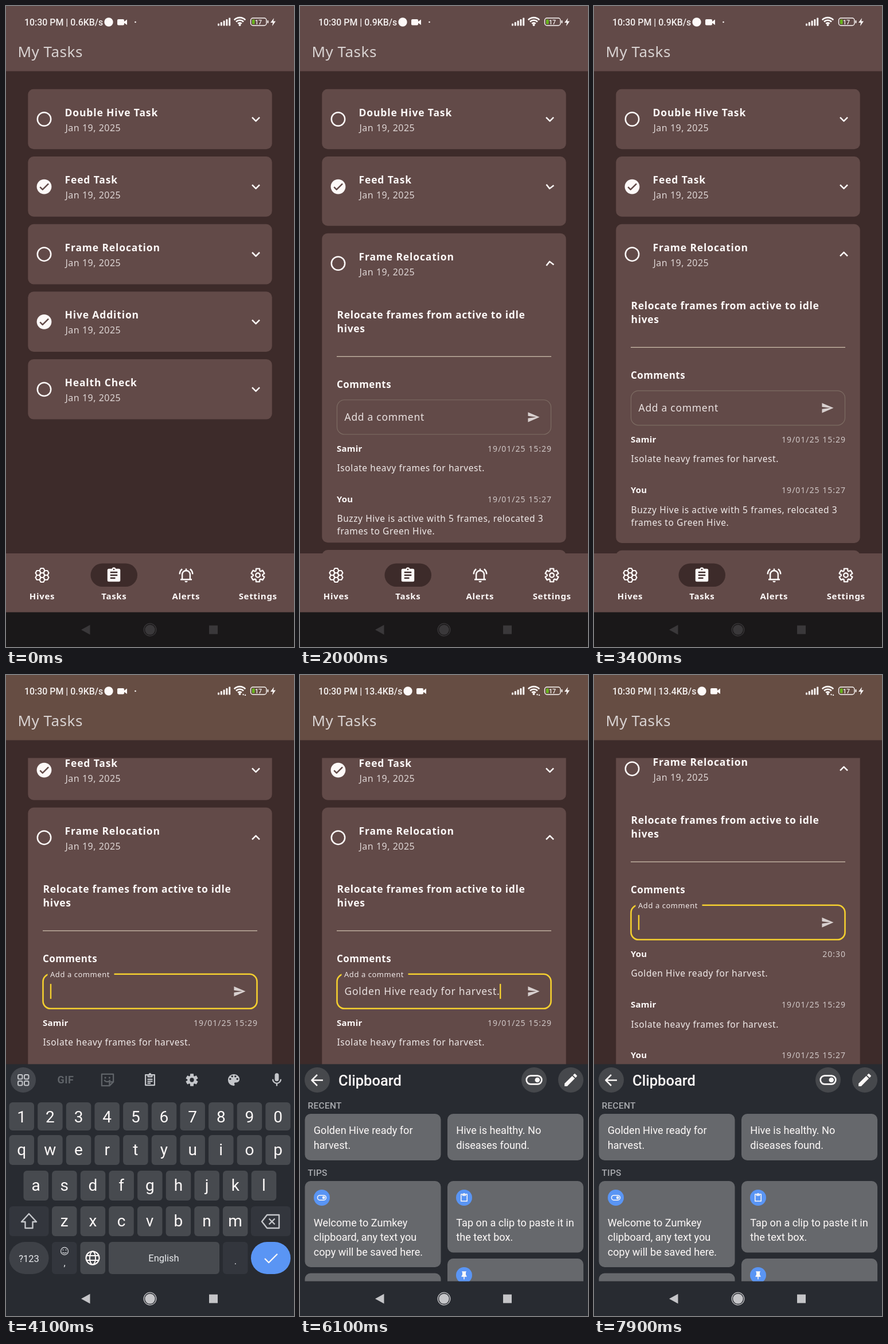
An HTML page that plays this animation: 502x1116 px, repeating every 8 s.

```html
<!DOCTYPE html>
<html lang="en">
<head>
<meta charset="utf-8">
<title>My Tasks</title>
<style>
html, body { margin: 0; width: 100%; height: 100%; overflow: hidden; background: #3d2b2a; }
#stage { display: block; width: 100%; height: 100%; }
text { font-family: "Noto Sans", sans-serif; fill: #fdf9f8; white-space: pre; }
.screen { font-size: 26px; font-weight: 500; letter-spacing: .5px; fill: #d8d2d1; }
.title { font-size: 17.5px; font-weight: 600; letter-spacing: .85px; }
.date { font-size: 16px; letter-spacing: .5px; fill: #ded5d4; }
.task { font-size: 17.5px; font-weight: 600; letter-spacing: .65px; }
.section { font-size: 17px; font-weight: 700; letter-spacing: .4px; }
.author { font-size: 15px; font-weight: 700; letter-spacing: .2px; }
.stamp { font-size: 14px; letter-spacing: 1px; fill: #d0c7c6; text-anchor: end; }
.body { font-size: 15.5px; letter-spacing: .58px; fill: #f1ebea; }
.input { font-size: 17.5px; letter-spacing: .7px; fill: #e9e1e0; }
.label { font-size: 13px; letter-spacing: .55px; fill: #efe8e7; }
.tab { font-size: 15px; font-weight: 600; letter-spacing: .7px; text-anchor: middle; }
.status, .battery, .key, .small, .panel, .group, .clip, .gif { font-family: Roboto, sans-serif; }
.status { font-size: 15.9px; font-weight: 500; fill: #f4f0ef; }
.battery { font-size: 10.5px; font-weight: 500; text-anchor: middle; }
.key { font-size: 28px; text-anchor: middle; }
.small { font-size: 16.5px; text-anchor: middle; fill: #e8eaed; }
.gif { font-size: 18px; font-weight: 700; letter-spacing: .5px; text-anchor: middle; fill: #5f6368; }
.panel { font-size: 25.5px; font-weight: 500; }
.group { font-size: 15.5px; font-weight: 500; letter-spacing: .3px; fill: #a9abaf; }
.clip { font-size: 18.1px; }
</style>
</head>
<body>
<svg id="stage" viewBox="0 0 502 1116" preserveAspectRatio="none"></svg>
<script>
const LOOP = 8000, STEP = 100;
const CARD = '#624a48', DARK = '#3d2b2a', WHITE = '#fdf9f8', YELLOW = '#f4cf2f';
const PANEL = '#282b31', KEY = '#474a4f', DIM_KEY = '#33363d', GREY = '#c4c6ca', BLUE = '#5a95f4';
const HEADER = 104.7, GAP = 12.9, LIST_TOP = 144.5;
const NOTE = 'Golden Hive ready for harvest.';

// Moments of the story, in ms
const OPEN_FEED = 0, SWAP = 1800, FOCUS = 3600, CLIPBOARD = 4600, NETWORK = 4800,
      PASTE = 5700, SEND = 6800, SCROLL = 7400;

const easeOut = p => 1 - (1 - p) ** 3;
const easeInOut = p => (1 - Math.cos(Math.PI * p)) / 2;
const ramp = (t, from, length) => Math.min(1, Math.max(0, (t - from) / length));

// Drawing helpers
const text = (cls, x, y, s) => `<text class="${cls}" x="${x}" y="${y}">${s}</text>`;
const rect = (x, y, w, h, fill, r = 0, extra = '') =>
  `<rect x="${x}" y="${y}" width="${w}" height="${h}" rx="${r}" fill="${fill}" ${extra}/>`;
const disc = (x, y, r, fill, extra = '') => `<circle cx="${x}" cy="${y}" r="${r}" fill="${fill}" ${extra}/>`;
const ring = (x, y, r, color, w) => disc(x, y, r, 'none', `stroke="${color}" stroke-width="${w}"`);
const shape = (d, fill) => `<path d="${d}" fill="${fill}"/>`;
const line = (d, color, w = 2) =>
  `<path d="${d}" fill="none" stroke="${color}" stroke-width="${w}" stroke-linejoin="round"/>`;
const move = (x, y, s, extra = '') => `<g transform="translate(${x} ${y}) ${extra}">${s}</g>`;
// Places artwork made on a 24 unit grid, centred on x, y
const icon = (x, y, size, art) => move(x, y, art, `scale(${size / 24}) translate(-12 -12)`);
const clipBox = (x, y, w, h, s) => `<svg x="${x}" y="${y}" width="${w}" height="${h}">${s}</svg>`;

const polar = (r, deg) => [r * Math.cos(deg * Math.PI / 180), r * Math.sin(deg * Math.PI / 180)];
const polygon = points => 'M' + points.map(p => p.map(v => v.toFixed(2)).join(' ')).join('L') + 'Z';
const gearPath = polygon([0, 1, 2, 3, 4, 5].flatMap(k =>
  [[7, -24], [10, -15], [10, 15], [7, 24]].map(([r, a]) => polar(r, 60 * k + 30 + a))));
const hexPath = polygon([0, 1, 2, 3, 4, 5].map(k => polar(4.6, 60 * k)));

const sendArt = color => shape('M2 21L23 12 2 3V10l15 2-15 2z', color);
const checkArt = (color, w = 2) => line('M4.1 12.7L9 17.6 20.3 6.3', color, w);
const clipboardArt = (color, lines) =>
  line('M5 4H19V20H5ZM9 3.5V7H15V3.5' + (lines ? 'M8 11H16M8 14H16M8 17H13' : ''), color) +
  disc(12, 3.4, 2, color);
const toggleArt = color => rect(2, 6.5, 20, 11, 'none', 5.5, `stroke="${color}" stroke-width="2"`) +
  disc(16.3, 12, 3.2, color);
const tasksArt = shape('M19 3h-4.2a3 3 0 0 0-5.6 0H5a2 2 0 0 0-2 2v14a2 2 0 0 0 2 2h14a2 2 0 0 0 2-2V5a2 2 0 0 0-2-2z', WHITE) +
  disc(12, 4, 1, DARK) + line('M7 8H17M7 12H17M7 16H14', DARK);
const bellArt = line('M6.5 17V11a5.5 5.5 0 0 1 11 0v6M4 18H20M12 5V2.8' +
  'M3 10.5C3 7.500 4.400 5 6.500 3.500M21 10.500C21 7.500 19.600 5 17.500 3.500', WHITE) +
  shape('M10 20h4a2 2 0 0 1-4 0z', WHITE);
const paletteArt = shape('M12 3a9 9 0 0 0 0 18c1.5 0 1.900-1.500 1.100-2.500-.9-1 0-2.500 1.100-2.500H16a5 5 0 0 0 5-5C21 6.600 17 3 12 3z', GREY) +
  [[6.5, 10.5], [9.5, 6.5], [14.5, 6.5], [17.5, 10.5]].map(([x, y]) => disc(x, y, 1.5, PANEL)).join('');
const micArt = shape('M12 14a3 3 0 0 0 3-3V5a3 3 0 0 0-6 0v6a3 3 0 0 0 3 3z', GREY) +
  line('M6 11a6 6 0 0 0 12 0M12 17V21', GREY);
const pencilArt = shape('M3 17.2V21h3.800L17.800 9.900 14.100 6.200zM20.700 7a1 1 0 0 0 0-1.400L18.400 3.300a1 1 0 0 0-1.400 0L15.100 5.100 18.900 8.900z', WHITE);
const pinArt = shape('M7 3H17V5H16V11L18 14V15.500H13V21L12 22 11 21V15.500H6V14L8 11V5H7z', WHITE);

function statusBar(t) {
  const late = t >= NETWORK, shift = late ? 9 : 0;
  const rate = late ? '13.4' : t < 1000 ? '0.6' : '0.9';
  let s = text('status', 32, 33.5, `10:30 PM | ${rate}KB/s`);
  s += move(shift, 0, disc(179, 28, 7.7, WHITE) + rect(194, 23, 12, 10.500, WHITE, 2) +
    shape('M206 27L211 23.500V33L206 29.500z', WHITE));
  if (!late) s += disc(225.500, 28, 1.300, WHITE);
  for (let i = 0; i < 5; i++) s += rect(369 + 4.800 * i, 30.500 - 2.500 * i, 3, 4 + 2.500 * i, WHITE, 1);
  for (const r of [4.500, 9, 13.500]) {
    const d = r * .72;
    s += line(`M${407.5 - d} ${34 - d}A${r} ${r} 0 0 1 ${407.5 + d} ${34 - d}`, WHITE, 2.600);
  }
  s += disc(407.500, 33, 2, WHITE);
  if (t >= FOCUS + 300) s += shape('M412 33h3l-1.500 3zM415.500 36h3l-1.500-3z', WHITE);
  s += rect(426.500, 21, 27.500, 13, 'none', 4, `stroke="${WHITE}" stroke-width="1.4"`) +
    rect(429, 23.500, 4.500, 8, '#68b51c', 1) + rect(455.500, 25, 2, 5, WHITE, 1) +
    text('battery', 440, 31.500, '17') + shape('M467 21L461 29H465L464 35 470 26.500H466z', WHITE);
  return s;
}

const comment = (y, [author, stamp, ...lines]) =>
  text('author', 64, y, author) + text('stamp', 439, y, stamp) +
  lines.map((l, i) => text('body', 64.500, y + 34.500 + 22 * i, l)).join('');

function commentField(y, t) {
  const focused = t >= FOCUS, pasted = t >= PASTE && t < SEND;
  let s = rect(64.500, y, 373, 60, 'none', 13,
    focused ? `stroke="${YELLOW}" stroke-width="2.6"` : 'stroke="#7d6c63" stroke-width="1.2"');
  s += icon(407, y + 30, 23, sendArt('#d8d0cf'));
  if (!focused) return s + text('input', 77.500, y + 36, 'Add a comment');
  s += rect(72.500, y - 3, 116, 6, CARD) + text('label', 77, y + 5, 'Add a comment');
  if (pasted) s += text('input', 77.500, y + 36, NOTE);
  const phase = t < PASTE ? Math.max(t, 4000) % 1000 : (t - PASTE) % 1000;
  if (phase < 500) s += rect(pasted ? 348 : 76.800, y + 17, 2.400, 26, YELLOW);
  return s;
}

function details(task, y, t) {
  const rule = y + 190.200 + 24.400 * (task.lines.length - 1);
  let s = task.lines.map((l, i) => text('task', 64.500, y + 148 + 24.300 * i, l)).join('');
  s += rect(64, rule - .6, 374, 1.300, '#c9bba9') + text('section', 64, rule + 54.500, 'Comments');
  if (!task.done) s += commentField(rule + 75.500, t);
  const first = rule + (task.done ? 104 : 165.500);
  return s + task.comments.map((c, i) => comment(first + 88.200 * i, c)).join('');
}

function card(task, y, t) {
  const height = HEADER + task.extra * task.open, mid = y + 52.500;
  let s = rect(38.300, y, 425.400, height, CARD, 10);
  s += task.done
    ? disc(66.500, mid, 12.900, WHITE) + icon(66.500, mid, 22, checkArt(CARD, 2.700))
    : ring(66.500, mid, 11.700, WHITE, 2.500);
  s += text('title', 102.500, y + 47, task.name) + text('date', 103.500, y + 73, 'Jan 19, 2025');
  s += move(435.500, mid, line('M-6.500 -3.200L0 3.300 6.500 -3.200', WHITE, 2.500), `rotate(${180 * task.open})`);
  if (task.open > 0) s += clipBox(0, 0, 502, y + height, details(task, y, t));
  return { s, height };
}

function taskList(t, scroll) {
  const swap = easeOut(ramp(t, SWAP, 300));
  const sent = t >= SEND;
  const tasks = [
    { name: 'Double Hive Task' },
    { name: 'Feed Task', done: true, extra: 431, open: easeOut(ramp(t, OPEN_FEED, 400)) * (1 - swap),
      lines: ['Feed Green and Sunny Hive'],
      comments: [['Samir', '19/01/25 16:55', 'Feed restocked.'],
                 ['Samir', '19/01/25 15:29', 'Restocking next Monday.'],
                 ['You', '19/01/25 15:28', 'Feed added. Feed needs restocking.']] },
    { name: 'Frame Relocation', extra: 450.500 + (sent ? 88.200 : 0), open: swap,
      lines: ['Relocate frames from active to idle', 'hives'],
      comments: [...(sent ? [['You', '20:30', NOTE]] : []),
                 ['Samir', '19/01/25 15:29', 'Isolate heavy frames for harvest.'],
                 ['You', '19/01/25 15:27', 'Buzzy Hive is active with 5 frames, relocated 3', 'frames to Green Hive.']] },
    { name: 'Hive Addition', done: true },
    { name: 'Health Check' }
  ];
  let y = -scroll, s = '';
  for (const task of tasks) {
    const drawn = card({ extra: 0, open: 0, ...task }, y, t);
    s += drawn.s;
    y += drawn.height + GAP;
  }
  return clipBox(0, LIST_TOP, 502, 953 - LIST_TOP, s);
}

function tabBar() {
  let s = rect(0, 953, 502, 103, CARD) + rect(147.500, 970.500, 81.500, 40.500, DARK, 20.200);
  s += move(63, 991, line(hexPath, WHITE, 2.200));
  for (let k = 0; k < 6; k++) s += move(...polar(8, 60 * k + 30).map((v, i) => v + [63, 991][i]), line(hexPath, WHITE, 2.200));
  s += icon(188, 991, 30, tasksArt) + icon(314, 991, 30, bellArt);
  s += move(439, 991, line(gearPath, WHITE, 2) + ring(0, 0, 3.200, WHITE, 2), 'scale(1.18)');
  ['Hives', 'Tasks', 'Alerts', 'Settings'].forEach((n, i) => s += text('tab', 63 + 125.400 * i, 1033, n));
  return s;
}

function keyboard() {
  let s = disc(30, 705, 22, '#44474d');
  for (const x of [21, 32]) for (const y of [696, 707])
    s += rect(x, y, 7.500, 7.500, 'none', 2, `stroke="${GREY}" stroke-width="2"`);
  s += text('gif', 104, 711, 'GIF');
  s += icon(177, 705, 27, line('M3 3H21V15L15 21H3ZM21 15H15V21M7 12a5 5 0 0 0 9 0', '#5f6368') +
    disc(8.500, 8.500, 1.400, '#5f6368') + disc(15, 8.500, 1.400, '#5f6368'));
  s += icon(251, 705, 27, clipboardArt(GREY, true));
  s += move(324, 705, shape(gearPath, GREY) + disc(0, 0, 3.300, PANEL), 'scale(1.1)');
  s += icon(397, 705, 27, paletteArt) + icon(472, 705, 28, micArt);

  const rows = [['1234567890', 5.500, 744, 49, 779], ['qwertyuiop', 5.500, 801, 52, 836],
                ['asdfghjkl', 30.500, 863, 52, 898], ['zxcvbnm', 80, 925, 52, 960]];
  for (const [keys, x0, y, h, base] of rows)
    [...keys].forEach((k, i) => {
      const x = x0 + 49.650 * i;
      s += rect(x, y, 43.500, h, KEY, 6) + text('key', x + 21.700, base, k);
    });
  s += rect(5.500, 925, 69, 52, DIM_KEY, 6) + rect(427, 925, 69, 52, DIM_KEY, 6);
  s += line('M40 938L27 952H33.500V963H46.500V952H53Z', GREY, 2.400);
  s += line('M455 940H476V963H455L446 951.500ZM458.500 946.500L468.500 956.500M468.500 946.500L458.500 956.500', GREY, 2.400);

  s += rect(5.500, 987, 69, 56, '#3e4147', 28) + text('small', 40, 1022, '?123');
  s += rect(80, 987, 43.500, 56, DIM_KEY, 6) + ring(102, 1003, 6.500, GREY, 1.400) +
    disc(99.500, 1001, 1, GREY) + disc(104.500, 1001, 1, GREY) + line('M98.500 1005a4 3 0 0 0 7 0', GREY, 1.400) +
    text('small', 102, 1029, ',');
  s += rect(129.500, 987, 43.500, 56, KEY, 6) + ring(151, 1015, 11.500, WHITE, 2.200) +
    `<ellipse cx="151" cy="1015" rx="5" ry="11.5" fill="none" stroke="${WHITE}" stroke-width="2"/>` +
    line('M141 1011H161M141 1019H161', WHITE);
  s += rect(179, 987, 193, 56, KEY, 6) + text('small', 275, 1021, 'English');
  s += rect(378, 987, 43.500, 56, DIM_KEY, 6) + text('small', 400, 1026, '.');
  return s + rect(427, 987, 69, 56, BLUE, 28) + line('M451 1016L458 1023 473 1008', WHITE, 2.300);
}

function clipboardPanel() {
  const tile = (x, y, h, lines, base) => rect(x, y, 237, h, '#66686c', 10) +
    lines.map((l, i) => text('clip', x + 15.300, base + 25.500 * i, l)).join('');
  const badge = (x, y, art) => disc(x, y, 14, BLUE) + icon(x, y, 18, art);
  const right = 257;
  let s = [30, 408, 472].map(x => disc(x, 705, 22, '#46484c')).join('');
  s += line('M40 705.500H21M30 696L20.500 705.500 30 715', WHITE, 2.500) + text('panel', 67, 715, 'Clipboard');
  s += icon(408, 705, 32, toggleArt(WHITE)) + icon(472, 705, 29, pencilArt);
  s += text('group', 13.500, 755, 'RECENT') + text('group', 13.500, 871.500, 'TIPS');
  s += tile(8.500, 764, 81, ['Golden Hive ready for', 'harvest.'], 799);
  s += tile(right, 764, 81, ['Hive is healthy. No', 'diseases found.'], 799);
  s += tile(8.500, 881, 150, ['Welcome to Zumkey', 'clipboard, any text you', 'copy will be saved here.'], 959.500);
  s += tile(right, 881, 124.500, ['Tap on a clip to paste it in', 'the text box.'], 959.500);
  s += tile(8.500, 1041.500, 60, [], 0) + tile(right, 1016, 90, [], 0);
  s += badge(38, 910, toggleArt(WHITE)) + badge(286, 910, clipboardArt(WHITE)) + badge(286, 1045, pinArt);
  return clipBox(0, 0, 502, 1055.500, s);
}

function systemBar(color) {
  return shape('M131 1086L146.500 1077.500V1094.500z', color) + ring(251, 1086, 10.800, color, 1.300) +
    disc(251, 1086, 8.800, color) + rect(354, 1078.500, 15, 15, color);
}

function scene(t) {
  const rise = easeOut(ramp(t, FOCUS - 100, 500));
  const scroll = 149 * rise + 120 * easeInOut(ramp(t, SCROLL, 500));
  let s = rect(0, 0, 502, 1116, DARK) + taskList(t, scroll);
  s += rect(0, 0, 502, 113.500, scroll > 0 ? '#664d43' : CARD) + statusBar(t);
  s += text('screen', 20.500, 88.500, 'My Tasks') + tabBar() + rect(0, 1055.500, 502, 60.500, '#1a1819');
  if (rise > 0)
    s += move(0, 439 * (1 - rise), rect(0, 677.500, 502, 439, PANEL) + (t < CLIPBOARD ? keyboard() : clipboardPanel()));
  return s + systemBar(rise > 0 ? '#c5c5c8' : '#3a383a');
}

const stage = document.getElementById('stage');
let shown = -1;
function tick() {
  const t = Math.floor(performance.now() % LOOP / STEP) * STEP;
  if (t !== shown) stage.innerHTML = scene(shown = t);
  requestAnimationFrame(tick);
}
tick();
</script>
</body>
</html>
```
